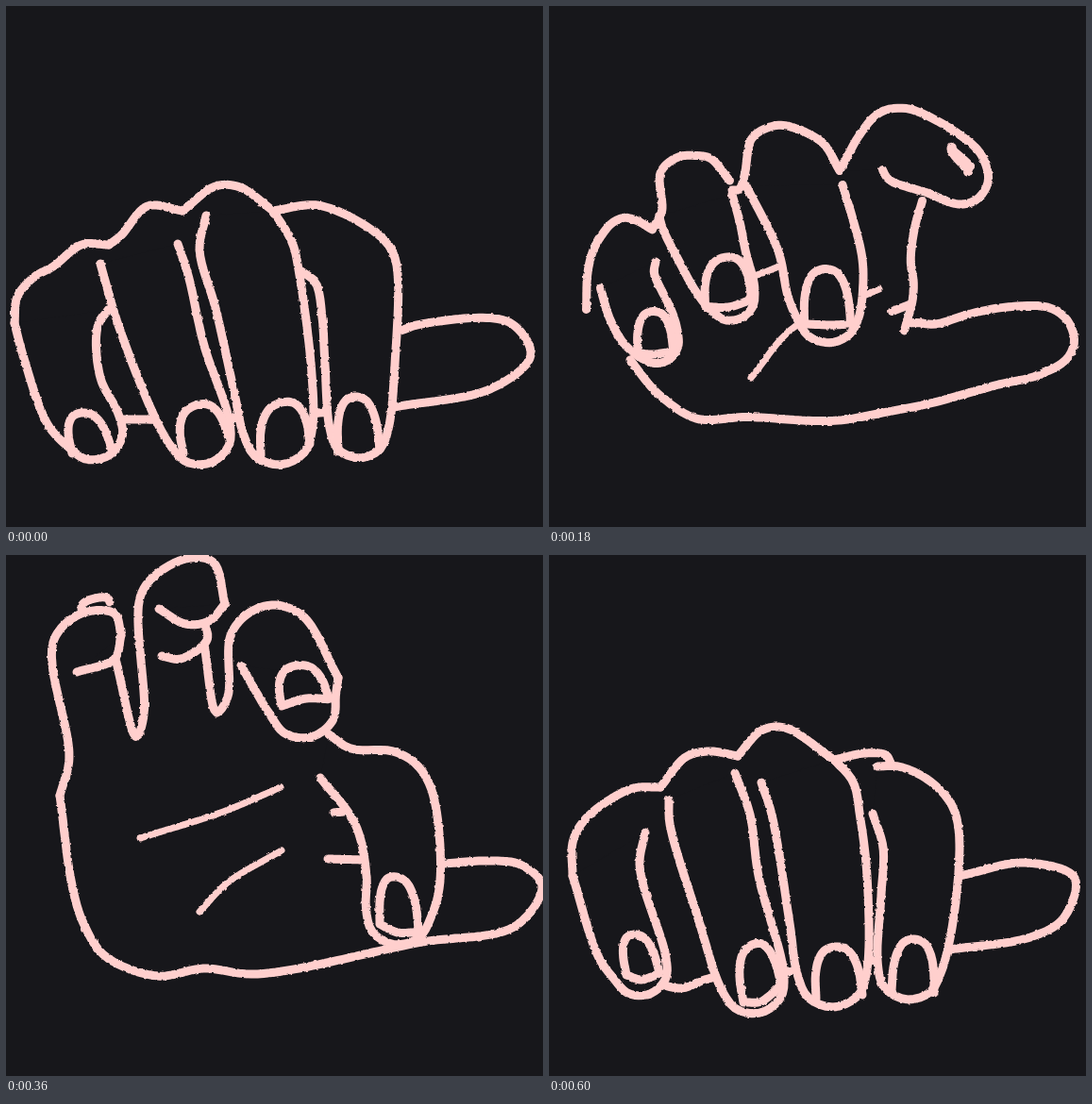
Write an HTML page that moves like this. It is 569 by 552 pixels and loops after 0.63 s.

```html
<!DOCTYPE html>
<html lang="en">
<head>
<meta charset="utf-8">
<title>Finger tapping hand</title>
<style>
html, body { margin: 0; width: 100%; height: 100%; overflow: hidden; background: #17171b; }
svg { display: block; width: 100vw; height: 100vh; }
path { stroke: #ffcfcd; stroke-width: 9; stroke-linecap: round; stroke-linejoin: round; fill: none; }
.thin { stroke-width: 7; }
.body { fill: #17171b; }
</style>
</head>
<body>
<svg viewBox="0 0 569 552">
  <filter id="chalk" filterUnits="userSpaceOnUse" x="0" y="0" width="569" height="552" color-interpolation-filters="sRGB">
    <feTurbulence id="grain" type="fractalNoise" baseFrequency="0.28" numOctaves="1" result="n"/>
    <feDisplacementMap in="SourceGraphic" in2="n" scale="3" xChannelSelector="R" yChannelSelector="G"/>
  </filter>
  <g id="hand" filter="url(#chalk)"></g>
</svg>
<script>
const STEP = 30, STEPS = 21, SAMPLES = 80;

// Back to front
const LINES = ['thumb', 'palm', 'lineA', 'lineB', 'web', 'foldA', 'foldB'];
const FINGERS = ['index', 'middle', 'ring', 'pinky'];

// A finger is [body, nail, top].
// Body: one side / round tip x,y,radius / other side.
// Nail: left, crown, right and, where the edge shows, its middle.
const POSES = [
  { at: 0,
    thumb: '418,344 440,337 533,335 556,370 515,405 411,425',
    palm: '124,438 200,438 290,434 411,425',
    index: ['283,217 330,211 378,231 405,253 414,275 412,380 / 374,448,31 / 338,380 335,330 328,293 313,281', '352,472 370,414 396,470'],
    middle: ['212,222 205,258 222,320 243,415 / 288,449,37 / 324,390 311,285 303,250 283,217', '270,476 292,420 322,464', '283,217 248,192 222,191 187,217'],
    ring: ['100,273 118,335 155,430 / 205,452,34 / 210,360 193,285 182,252', '188,474 201,423 236,458', '187,217 150,212 122,243 109,253'],
    pinky: ['9,336 18,370 44,443 / 92,449,32 / 100,394 97,340 108,322', '70,474 80,431 112,470', '109,253 80,253 50,276 30,287 12,308 9,336'] },
  { at: 4,
    thumb: '386,332 410,339 450,324 540,326 554,372 500,401 455,405 390,429 327,432',
    palm: '120,450 165,440 232,434 327,432',
    web: '381,250 375,303 384,322 382,340 364,360',
    foldA: '355,336 382,328',
    index: ['296,202 343,140 360,133 382,137 428,195 / 416,242,29 / 380,240 335,204 333,194', '404,247 412,205 440,236 424,239'],
    middle: ['201,236 228,320 243,380 / 293,408,35 / 327,338 315,280 302,232', '267,428 284,378 311,426 290,434', '296,202 278,185 240,185 220,190 185,225'],
    ring: ['105,258 108,285 145,385 / 201,421,34 / 216,350 205,300 190,254', '178,442 199,379 229,432 205,442', '185,225 135,224 104,256'],
    pinky: ['27,343 45,383 68,425 / 111,433,28 / 128,396 103,340 111,324', '90,447 104,402 130,444 108,449', '104,256 87,257 60,273 35,290 26,310 27,343'] },
  { at: 8,
    thumb: '372,341 383,334 410,337 470,320 545,318 562,360 500,396 430,410 370,432',
    palm: '52,300 70,380 115,438 185,437 275,446 320,445 370,432',
    lineA: '171,302 245,275 268,260',
    lineB: '214,394 260,340 350,300',
    web: '410,163 398,195 387,290 389,328',
    foldA: '372,311 384,304',
    index: ['320,147 335,110 355,88 400,83 / 453,120,34 / 405,162 385,162 374,153', '478,94 430,98 483,105'],
    middle: ['217,145 257,195 / 300,234,37 / 338,205 320,147', '274,246 301,179 328,246 300,242', '320,147 300,103 250,68 225,75 210,92 217,145 214,168 203,165'],
    ring: ['128,187 / 174,185,31 / 198,145', '153,195 174,153 200,190 177,196', '198,145 178,100 155,95 130,98 107,125 128,187 118,212'],
    pinky: ['82,255 / 110,274,27 / 130,245 115,218', '98,288 116,245 133,287 112,289', '115,218 88,184 72,188 62,210 52,300'] },
  { at: 12,
    thumb: '464,327 510,324 545,328 568,350 540,393 440,410',
    palm: '57,255 70,350 82,390 105,425 160,446 210,438 265,444 440,410',
    lineA: '142,300 230,272 291,246',
    lineB: '205,378 235,347 292,313',
    foldA: '347,273 362,270 366,252',
    foldB: '341,322 380,323',
    index: ['342,190 365,205 410,208 435,222 452,252 460,345 / 416,378,35 / 382,340 370,285 333,236', '396,391 414,341 437,399 415,400'],
    middle: ['249,117 265,145 / 314,157,37 / 352,130', '292,160 308,117 342,153 318,152', '352,130 315,65 285,53 258,61 238,85 235,150 223,167 210,95'],
    ring: ['162,57 190,73 215,70 232,52', '', '232,52 220,8 195,3 160,20 142,45 146,170 138,193 116,110'],
    ringFold: '165,107 185,110 213,90 211,73',
    pinky: ['75,124 115,110 122,85', '80,57 94,46 110,50', '122,85 115,62 80,62 50,92 67,215 57,255'] },
  { at: 15,
    thumb: '446,341 510,332 566,352 550,393 510,407 436,416',
    palm: '55,265 75,360 110,430 138,438 195,434 255,443 354,422 436,416',
    lineA: '143,327 165,320 250,268',
    lineB: '200,383 225,355 266,315',
    index: ['341,194 365,203 385,222 415,236 443,300 435,370 / 392,434,33 / 354,422', '368,450 393,404 412,456'],
    middle: ['255,220 270,320 / 309,352,35 / 352,295 340,210 338,150', '281,370 306,321 330,370 305,376', '338,150 310,116 285,118 265,135 240,170 222,180'],
    ring: ['166,184 180,194 205,192 219,180', '179,179 190,141 208,178 194,182', '219,180 217,100 180,78 150,87 140,105 142,180 132,198 101,100'],
    pinky: ['97,52 103,68 101,100', '', '101,100 103,68 78,42 55,50 33,75 36,115 63,205 64,235 55,265'] },
  { at: 18,
    thumb: '435,340 510,330 562,350 550,391 510,410 424,422',
    palm: '82,395 100,437 122,451 178,450 300,445 424,422',
    foldA: '341,290 354,297',
    index: ['310,207 345,203 375,220 430,252 440,305 432,380 / 384,432,33 / 358,370 354,290 358,264', '356,446 384,408 404,460'],
    middle: ['228,234 255,320 262,430 / 299,435,36 / 340,340 340,290 335,245 310,207', '280,464 300,413 326,460', '310,207 262,178 240,181 208,205'],
    ring: ['131,254 129,285 170,425 / 219,446,34 / 232,365 219,320 215,255', '202,465 213,410 240,455 218,474', '208,205 178,196 150,210 125,236 104,238'],
    pinky: ['14,330 25,365 / 67,370,28 / 83,335 81,300 84,268', '38,380 47,344 74,384 60,391', '104,238 88,222 68,215 45,222 25,243 14,330'] },
  { at: 20,
    thumb: '435,340 505,326 557,342 545,385 510,405 425,418',
    palm: '118,455 140,459 172,448 262,440 425,418',
    foldA: '302,217 335,210 357,212 362,220',
    index: ['348,224 370,224 400,237 425,262 434,290 430,375 / 382,437,34 / 352,360 354,310 343,274', '363,462 387,407 408,464'],
    middle: ['225,241 236,275 255,390 / 300,442,37 / 337,340 330,280 322,240 302,217', '283,470 303,415 332,466', '302,217 250,183 225,186 200,213'],
    ring: ['127,259 128,285 158,385 / 216,452,34 / 222,340 213,275 197,231', '206,474 215,413 246,455 225,473', '200,213 170,208 145,214 118,246'],
    pinky: ['25,340 52,425 / 96,437,30 / 100,350 96,325 102,294', '82,445 90,402 117,443 98,450', '118,246 90,247 60,262 35,284 25,305 25,340'] }
];

const mix = (a, b, u) => a + (b - a) * u;
const mix2 = (a, b, u) => [mix(a[0], b[0], u), mix(a[1], b[1], u)];
const dist = (a, b) => Math.hypot(b[0] - a[0], b[1] - a[1]);
const parse = text => text.trim().split(' ').map(s => s.split(',').map(Number));

// Two sides joined by a half circle that points away from them.
function body(text) {
  const [left, tip, right] = text.split('/').map(parse);
  if (!tip) return left;
  const [x, y, r] = tip[0], a = left[left.length - 1], b = right[0];
  const mid = mix2(a, b, 0.5), d = dist(mid, [x, y]);
  const dx = (x - mid[0]) / d, dy = (y - mid[1]) / d;
  const side = Math.sign((b[0] - a[0]) * dy - (b[1] - a[1]) * dx);
  const arc = [0, 1, 2, 3, 4].map(i => {
    const c = -side * r * Math.cos(i * Math.PI / 4), s = r * Math.sin(i * Math.PI / 4);
    return [x + c * dy + s * dx, y - c * dx + s * dy];
  });
  return [...left, ...arc, ...right];
}

// A squarish arch over the line from left to right.
function nail(text) {
  const [l, top, r, edge] = parse(text), c = mix2(l, r, 0.5);
  const arch = [];
  for (let i = 0; i <= 8; i++) {
    const a = i * Math.PI / 8, s = Math.sin(a) ** 0.8;
    const k = -Math.sign(Math.cos(a)) * Math.abs(Math.cos(a)) ** 0.8;
    arch.push([0, 1].map(j => c[j] + k * (r[j] - c[j]) + s * (top[j] - c[j])));
  }
  return edge ? [...arch, r, edge, l] : arch;
}

// Centripetal spline through the points, resampled evenly along its length.
function trace(p) {
  const gap = i => Math.sqrt(p[i] && p[i + 1] ? dist(p[i], p[i + 1]) : 0) || 1e-4;
  const slope = (i, c) => {
    const g = gap(i - 1), h = gap(i);
    const before = i > 0 ? (p[i][c] - p[i - 1][c]) / g : 0;
    const after = i < p.length - 1 ? (p[i + 1][c] - p[i][c]) / h : 0;
    if (i === 0) return after;
    return i === p.length - 1 ? before : (before * h + after * g) / (g + h);
  };
  const line = [p[0]], len = [0];
  for (let i = 0; i < p.length - 1; i++) {
    for (let k = 1; k <= 12; k++) {
      const t = k / 12, v = 1 - t, g = gap(i);
      const q = [0, 1].map(c =>
        v * v * (1 + 2 * t) * p[i][c] + t * t * (3 - 2 * t) * p[i + 1][c] +
        t * v * g * (v * slope(i, c) - t * slope(i + 1, c)));
      len.push(len[len.length - 1] + dist(line[line.length - 1], q));
      line.push(q);
    }
  }
  const total = len[len.length - 1], out = [];
  for (let s = 0, j = 0; s <= SAMPLES; s++) {
    const d = total * s / SAMPLES;
    while (j < len.length - 2 && len[j + 1] < d) j++;
    out.push(mix2(line[j], line[j + 1], (d - len[j]) / (len[j + 1] - len[j] || 1)));
  }
  return out;
}

const hand = document.getElementById('hand');
const grain = document.getElementById('grain');
const strokes = [];

// One stroke with its curve in every pose, or null where it is hidden.
function addStroke(kind, read, pick) {
  const el = document.createElementNS('http://www.w3.org/2000/svg', 'path');
  el.setAttribute('class', kind);
  hand.appendChild(el);
  const curves = POSES.map(pose => {
    const text = pick(pose);
    return text ? trace(read(text)) : null;
  });
  strokes.push({ el, curves });
}

for (const name of LINES) addStroke(name.startsWith('line') ? 'thin' : '', parse, pose => pose[name]);
for (const name of FINGERS) {
  addStroke('body', body, pose => pose[name][0]);
  addStroke('', parse, pose => pose[name][2]);
  addStroke('', nail, pose => pose[name][1]);
}
addStroke('', parse, pose => pose.ringFold);

function blend(a, b, u) {
  if (!a || !b) return (u < 0.5 ? a : b) || [];
  return a.map((p, i) => mix2(p, b[i], u));
}

function draw(step) {
  let k = POSES.length - 1;
  while (POSES[k].at > step) k--;
  const next = (k + 1) % POSES.length;
  const u = (step - POSES[k].at) / ((POSES[next].at || STEPS) - POSES[k].at);
  for (const { el, curves } of strokes) {
    const pts = blend(curves[k], curves[next], u);
    el.setAttribute('d', pts.length ? 'M' + pts.map(p => p[0].toFixed(1) + ' ' + p[1].toFixed(1)).join('L') : '');
  }
  grain.setAttribute('seed', step + 1);
}

const start = performance.now();
let shown = -1;
function tick() {
  const step = Math.floor((performance.now() - start) / STEP) % STEPS;
  if (step !== shown) draw(shown = step);
  requestAnimationFrame(tick);
}
tick();
</script>
</body>
</html>
```
